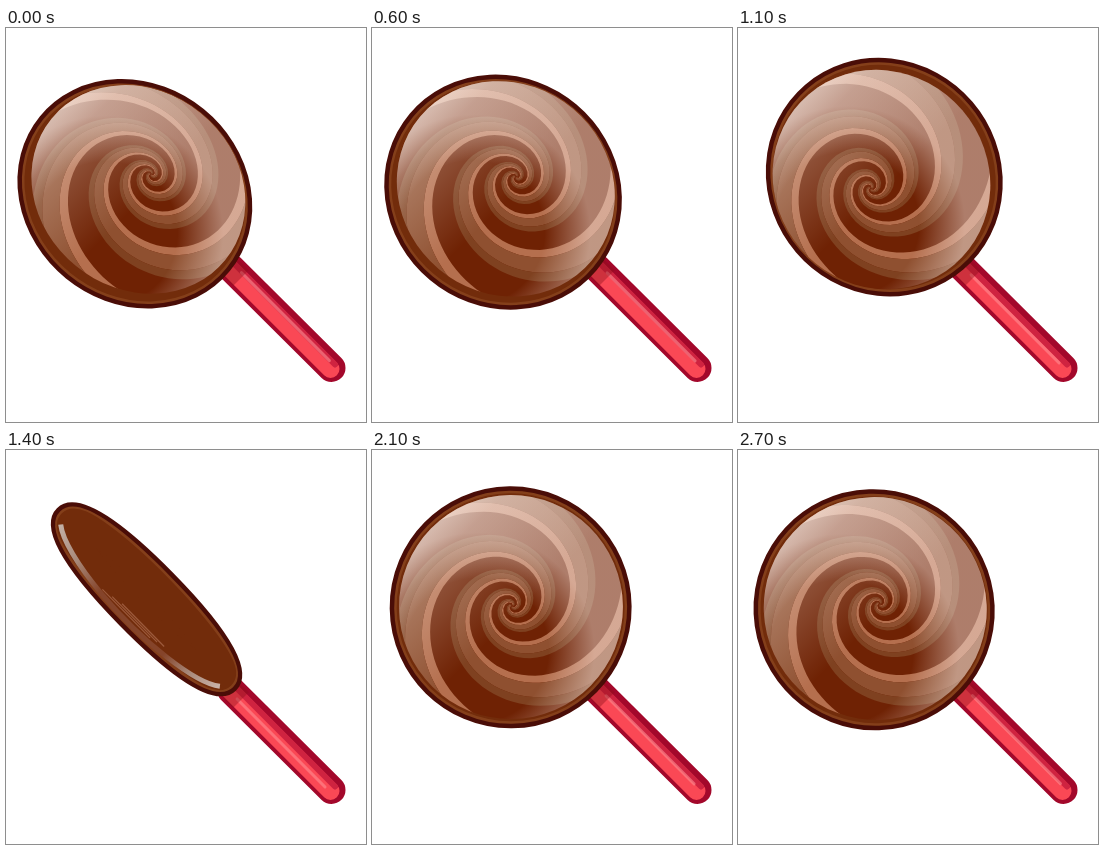
Write an HTML page with a canvas that moves like this. It is 360 by 394 pixels and loops after 2.8 s.

```html
<!DOCTYPE html>
<html lang="en">
<head>
<meta charset="utf-8">
<title>Chocolate lollipop</title>
<style>
html, body { margin: 0; width: 100%; height: 100%; overflow: hidden; background: #fff; }
canvas { display: block; }
</style>
</head>
<body>
<canvas id="stage" width="360" height="394"></canvas>
<script>
const ctx = document.getElementById('stage').getContext('2d');
const LOOP = 2800, STEP = 100, RAD = Math.PI / 180;

// Turn about the stick: [ms, degrees]
const TURN = [[0, -28], [200, -33], [400, -29], [600, -21], [800, 4], [1000, 12],
  [1200, 24], [1300, 38], [1400, 80], [1500, 114], [1600, 134], [1700, 145],
  [1900, 162], [2100, 178], [2300, 184], [2500, 183], [2600, 179], [2700, 172], [2800, 152]];

// Swirl bands: start and end within one arm, colour
const BANDS = [[0, .15, '#b56f4e'], [.15, .42, '#8f5030'], [.42, .56, '#7f4120']];
const ARMS = 3, TWIST = 3.5, CORE = 6;

function turnAt(t) {
  const i = TURN.findIndex(k => k[0] > t);
  const [t0, a] = TURN[i - 1], [t1, b] = TURN[i];
  return a + (b - a) * (t - t0) / (t1 - t0);
}

function line(x1, y1, x2, y2, width, color) {
  ctx.beginPath();
  ctx.moveTo(x1, y1);
  ctx.lineTo(x2, y2);
  ctx.lineWidth = width;
  ctx.strokeStyle = color;
  ctx.stroke();
}

function addStops(g, stops) {
  stops.forEach(([p, c]) => g.addColorStop(p, c));
  return g;
}

function drawStick(sin) {
  const s = sin * 3;
  ctx.lineCap = 'round';
  line(225, 240, 325.5, 340, 28, '#a3082b');
  line(223.5, 240, 324.5, 341, 18, '#fa4855');
  line(228, 235.5, 329, 336.5, 6, '#cf2340');
  line(234 - s, 246 + s, 322 - s, 334 + s, 3, 'rgba(255,140,145,.6)');
  ctx.lineCap = 'butt';
  line(222, 237, 235, 250, 22, 'rgba(140,15,25,.4)');
}

// Rounded disc edge: an ellipse thickened by a round stroke
function drawBody(a, b, inset, color) {
  const r = 20;
  ctx.beginPath();
  ctx.ellipse(0, 0, a - r, Math.max(b - r, 1), 0, 0, 2 * Math.PI);
  ctx.lineWidth = 2 * (r - inset);
  ctx.lineJoin = 'round';
  ctx.fillStyle = ctx.strokeStyle = color;
  ctx.fill();
  ctx.stroke();
}

function drawSwirl(hub, rim, R, squash) {
  const arm = 2 * Math.PI / ARMS;
  const point = (r, phase) => {
    const angle = phase - TWIST * Math.log((r + CORE) / (40 + CORE));
    const k = Math.min(r / R, 1);
    ctx.lineTo(r * Math.cos(angle), hub + (rim - hub) * k + r * Math.sin(angle) * squash);
  };
  for (let i = 0; i < ARMS; i++) {
    for (const [from, to, color] of BANDS) {
      const start = 135 * RAD + i * arm;
      ctx.beginPath();
      for (let r = 1; r < 150; r += 2) point(r, start + from * arm);
      for (let r = 149; r > 0; r -= 2) point(r, start + to * arm);
      ctx.fillStyle = color;
      ctx.fill();
    }
  }
}

function drawGloss(shift) {
  const x = 105 - shift, y = 200 + shift;
  ctx.fillStyle = addStops(ctx.createRadialGradient(x, y, 72, x, y, 118), [
    [0, 'rgba(255,242,238,0)'], [.5, 'rgba(255,242,238,.22)'], [1, 'rgba(255,242,238,.44)']]);
  ctx.fillRect(0, 0, 360, 394);
  ctx.fillStyle = addStops(ctx.createLinearGradient(48 - shift, 72 + shift, 142 - shift, 166 + shift), [
    [0, 'rgba(255,248,242,.6)'], [.3, 'rgba(255,246,240,.28)'], [1, 'rgba(255,246,240,0)']]);
  ctx.fillRect(0, 0, 360, 394);
}

// Nearly edge-on, only a streak of shine is left along one side
function drawStreak(a, b, side) {
  ctx.save();
  ctx.scale(1, side);
  ctx.beginPath();
  ctx.ellipse(0, 0, a - 9, b - 8, 0, .3, Math.PI - .3);
  ctx.lineWidth = 5;
  ctx.strokeStyle = addStops(ctx.createLinearGradient(-a, 0, a, 0), [
    [.05, '#c3b2a8'], [.2, '#a8897a'], [.35, '#85442a'],
    [.7, '#85442a'], [.82, '#a8897a'], [.95, '#cbb4aa']]);
  ctx.stroke();
  for (let i = 0; i < 3; i++) {
    line(-38 + 12 * i, b - 13 - 2 * i, 30 + 8 * i, b - 13 - 2 * i, 1.2, '#9c5a3c');
  }
  ctx.restore();
}

function drawDisc(th) {
  const sin = Math.sin(th), cos = Math.cos(th), sin2 = Math.sin(2 * th);
  const off = -17 * sin2;
  const a = 121 + 7 * sin * sin, b = 101 * cos + 20;
  const R = 112, faceY = 12 * sin;

  ctx.save();
  ctx.translate(139.5, 156.5);
  ctx.rotate(45 * RAD);
  ctx.translate(-4.5 * sin * sin, off);
  ctx.rotate(8 * sin2 * cos * RAD);
  drawBody(a, b, 0, '#4a0d07');
  drawBody(a, b, 4.5, '#843f1a');
  drawBody(a, b, 7, '#722c0b');

  if (cos < .25) {
    drawStreak(a, b, Math.sign(sin));
  } else {
    // Keep the face inside the edge
    ctx.beginPath();
    ctx.ellipse(0, 0, a - 5, b - 5, 0, 0, 2 * Math.PI);
    ctx.clip();
    ctx.beginPath();
    ctx.ellipse(0, faceY, R, R * cos, 0, 0, 2 * Math.PI);
    ctx.clip();
    ctx.fillStyle = '#6f2204';
    ctx.fillRect(-150, -150, 300, 300);
    drawSwirl(25 * sin - off, faceY, R, cos);
    ctx.setTransform(1, 0, 0, 1, 0, 0);
    drawGloss(off * .4);
  }
  ctx.restore();
}

function draw(t) {
  const deg = turnAt(t);
  const th = (deg > 90 ? deg - 180 : deg) * RAD;
  ctx.fillStyle = '#fff';
  ctx.fillRect(0, 0, 360, 394);
  drawStick(Math.sin(th));
  drawDisc(th);
}

const begin = performance.now();
function tick() {
  const t = (performance.now() - begin) % LOOP;
  draw(Math.floor(t / STEP) * STEP);
  requestAnimationFrame(tick);
}
tick();
</script>
</body>
</html>
```
